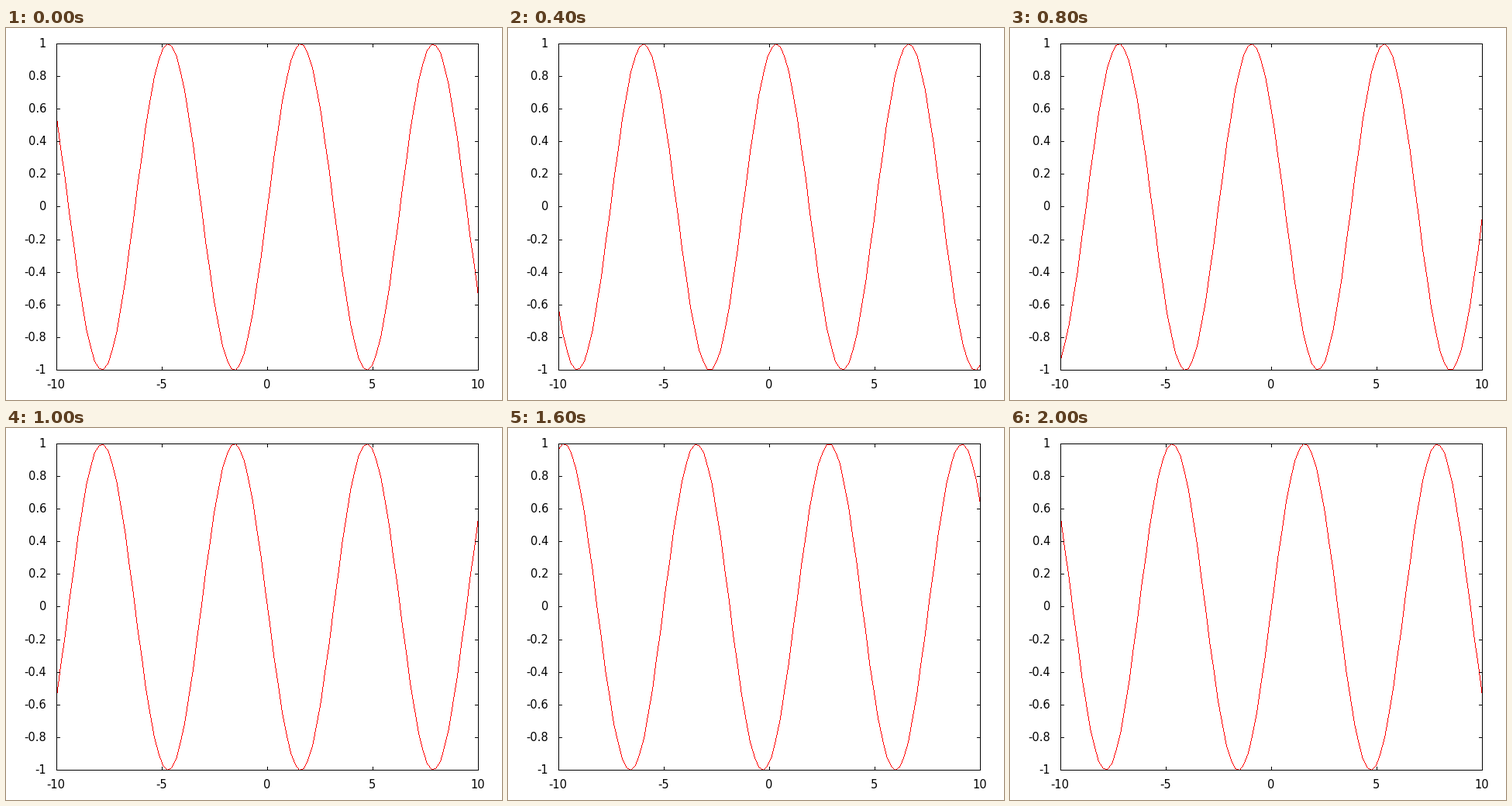
Write a matplotlib script that moves like this. It is 640x480 px and loops after 2.1 s.

```python
import numpy as np
import matplotlib.pyplot as plt
from matplotlib.animation import FuncAnimation

W, H, DPI = 640, 480, 100
LEFT, RIGHT, TOP, BOTTOM = 65, 609, 20, 441
TICK = 5
FRAMES, STEPS = 21, 20
PX = 72 / DPI

fig = plt.figure(figsize=(W / DPI, H / DPI), dpi=DPI, facecolor="white")
ax = fig.add_axes([0, 0, 1, 1])
ax.set(xlim=(0, W), ylim=(H, 0))
ax.axis("off")


def to_px(x):
    return np.floor(LEFT + (RIGHT - LEFT) * (x + 10) / 20 + 0.5)


def to_py(y):
    return np.ceil(BOTTOM - (BOTTOM - TOP) * (y + 1) / 2 - 0.5)


def bar(x0, y0, x1, y1):
    """Fill the pixels from (x0, y0) to (x1, y1), both included."""
    ax.add_patch(plt.Rectangle((x0, y0), x1 - x0 + 1, y1 - y0 + 1,
                               fc="black", lw=0, antialiased=False))


def label(x, y, value, **align):
    ax.text(x, y, f"{value:g}", family="DejaVu Sans", size=14.6 * PX,
            va="baseline", **align)


def raster(px, py):
    """Unsmoothed one-pixel polyline through whole-pixel vertices."""
    img = np.zeros((H, W, 4), np.uint8)
    for x0, y0, x1, y1 in zip(px, py, px[1:], py[1:]):
        n = int(max(abs(x1 - x0), abs(y1 - y0))) + 1
        cols = np.floor(np.linspace(x0, x1, n) + 0.5).astype(int)
        rows = np.floor(np.linspace(y0, y1, n) + 0.5).astype(int)
        img[rows, cols] = 255, 0, 0, 255
    return img


for x in (LEFT, RIGHT):
    bar(x, TOP, x, BOTTOM)
for y in (TOP, BOTTOM):
    bar(LEFT, y, RIGHT, y)

for v in range(-10, 11, 5):
    x = to_px(v)
    bar(x, TOP, x, TOP + TICK - 1)
    bar(x, BOTTOM - TICK + 1, x, BOTTOM)
    label(x - 0.5, 465, v, ha="center")

for k in range(-5, 6):
    y = to_py(k / 5)
    bar(LEFT, y, LEFT + TICK - 1, y)
    bar(RIGHT - TICK + 1, y, RIGHT, y)
    label(52, y + 5, k / 5, ha="right")

xs = np.linspace(-10, 10, 100)
px = to_px(xs)
curve = fig.figimage(raster(px, to_py(np.sin(xs))), origin="upper", zorder=-1)


def update(i):
    phase = 2 * np.pi * i / STEPS
    curve.set_data(raster(px, to_py(np.sin(xs + phase))))
    return curve,


anim = FuncAnimation(fig, update, frames=FRAMES, interval=100, repeat=True)
plt.show()
```
